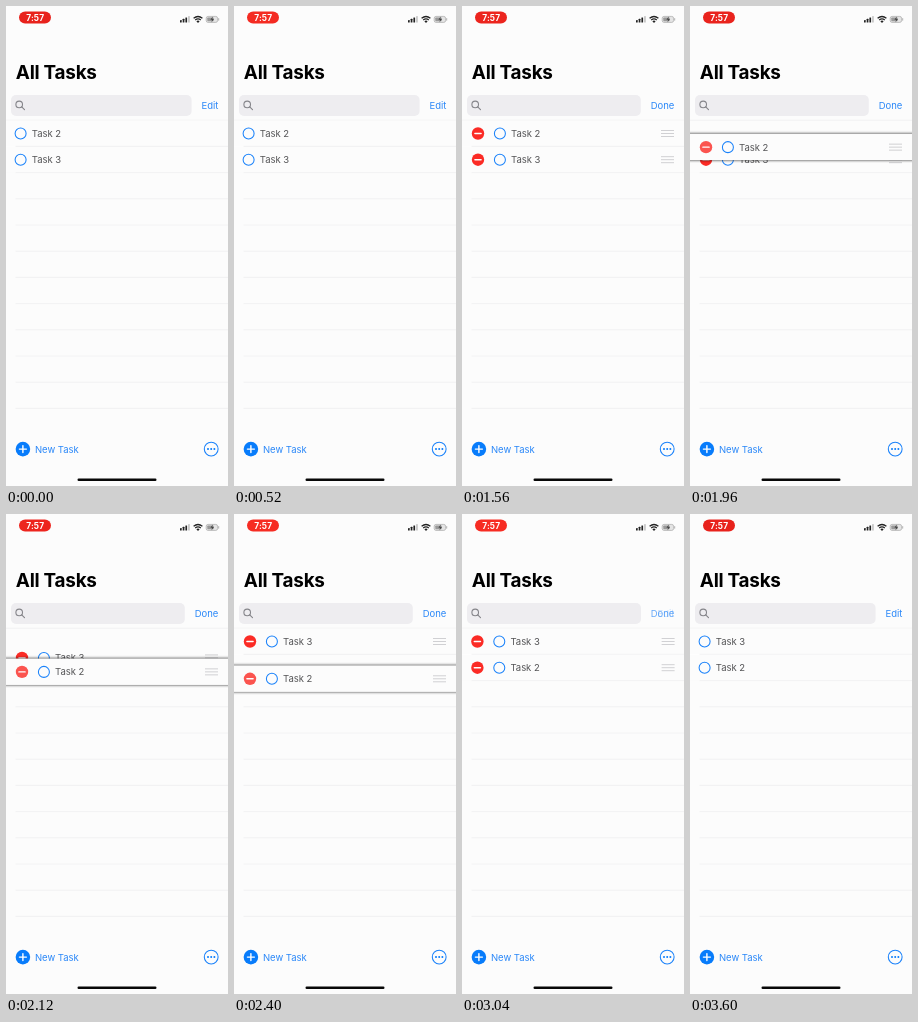
These frames come from a looping animation (222x480 px, 3640 ms). An HTML page:

```html
<!DOCTYPE html>
<html lang="en">
<head>
<meta charset="utf-8">
<title>All Tasks</title>
<style>
  html, body { margin: 0; width: 100%; height: 100%; overflow: hidden; background: #fcfcfc; }
  svg { display: block; width: 222px; height: 480px; }
  text { font: 400 9.5px Inter, "Liberation Sans", sans-serif; letter-spacing: -.05px; }
  .blue { fill: #087cfb; }
  text.blue { fill: #2b88f8; }
  .line { stroke: #efeff0; stroke-width: .8; }
  .ring { fill: none; stroke: #1a82fa; stroke-width: 1.05; }
  .grip { stroke: #d0d0d3; stroke-width: 1; }
  .mark { stroke: #fff; stroke-width: 1.4; stroke-linecap: round; }
  .title { font-size: 18.9px; font-weight: 650; letter-spacing: -.25px; }
  .clock { font-size: 8.4px; font-weight: 700; fill: #fff; letter-spacing: .1px; }
  .shadow { fill: #fcfcfc; filter: drop-shadow(0 .6px 1.6px rgba(0, 0, 0, .95)); }
</style>
</head>
<body>
<svg viewBox="0 0 222 480">
  <rect width="222" height="480" fill="#fcfcfc"/>

  <rect id="pill" x="13" y="5.4" width="32" height="12.2" rx="6.1"/>
  <text class="clock" x="29.2" y="14.6" text-anchor="middle">7:57</text>
  <g fill="#222">
    <rect x="174" y="14" width="1.7" height="2.6" rx=".4"/>
    <rect x="176.7" y="12.8" width="1.7" height="3.8" rx=".4"/>
    <rect x="179.4" y="11.4" width="1.7" height="5.2" rx=".4"/>
    <rect x="182.1" y="10" width="1.7" height="6.6" rx=".4" fill="#c4c4c4"/>
    <path d="M192 17l-1.6-1.8q1.6-1.3 3.2 0z"/>
  </g>
  <g fill="none" stroke="#222" stroke-width="1.3">
    <path d="M187.6 12.2q4.4-3.4 8.8 0M189.2 14q2.8-2.2 5.6 0"/>
  </g>
  <rect x="200.2" y="10.4" width="11.4" height="6" rx="1.8" fill="#e4e4e4" stroke="#aaa" stroke-width=".7"/>
  <rect x="201.3" y="11.5" width="6.4" height="3.8" rx=".8" fill="#999"/>
  <path d="M206.8 10.6l-2.4 3.2h1.7l-.6 2.5 2.5-3.3h-1.7z" fill="#444"/>
  <path d="M212.7 12.2v2.4" stroke="#aaa" stroke-width=".9"/>

  <text class="title" x="9.8" y="73.2">All Tasks</text>
  <rect id="field" x="5" y="89" height="21" rx="5" fill="#eeedf0"/>
  <g fill="none" stroke="#85858a" stroke-width="1.1" stroke-linecap="round">
    <circle cx="13.2" cy="98.4" r="3.3"/>
    <path d="M15.7 100.9l2.8 2.8"/>
  </g>
  <text id="edit" class="blue" x="212.3" y="103.1" text-anchor="end">Edit</text>
  <text id="done" class="blue" x="212.3" y="103.1" text-anchor="end">Done</text>

  <g id="lines"></g>
  <g id="rows"></g>

  <circle cx="16.9" cy="443.1" r="7.3" class="blue"/>
  <path class="mark" d="M13.4 443.1h7M16.9 439.6v7"/>
  <text class="blue" x="29" y="446.6">New Task</text>
  <circle class="ring" cx="205.2" cy="443.1" r="6.9"/>
  <g class="blue">
    <circle cx="202" cy="443.1" r="1"/>
    <circle cx="205.2" cy="443.1" r="1"/>
    <circle cx="208.4" cy="443.1" r="1"/>
  </g>
  <rect x="71.5" y="472.6" width="79" height="2.4" rx="1.2" fill="#080808"/>
</svg>
<script>
const LOOP = 3640, TOP = 114.2, PITCH = 26.2, INDENT = 23.3;
const $ = id => document.getElementById(id);

// Each track lists [time, value] steps, eased between neighbours.
const tracks = {
  editing: [[1020, 0], [1340, 1], [3010, 1], [3330, 0]],
  label:   [[1020, 0], [1110, 1], [3010, 1], [3100, 0]],
  lift:    [[1700, 0], [1860, 1], [2440, 1], [2700, 0]],
  drag:    [[1800, 0], [2150, 31], [2360, 37.3], [2440, 37.3], [2700, PITCH]],
  swap:    [[2005, 0], [2285, 1]]
};

const ease = p => p * p * (3 - 2 * p);

function at(name, t) {
  const steps = tracks[name];
  if (t <= steps[0][0]) return steps[0][1];
  for (let i = 1; i < steps.length; i++) {
    const [t0, a] = steps[i - 1], [t1, b] = steps[i];
    if (t < t1) return a + (b - a) * ease((t - t0) / (t1 - t0));
  }
  return steps[steps.length - 1][1];
}

function makeRow(name) {
  const row = document.createElementNS("http://www.w3.org/2000/svg", "g");
  row.innerHTML = `
    <rect class="shadow" x="-8" width="238" height="${PITCH}" opacity="0"/>
    <rect y=".4" width="222" height="${PITCH - .4}" fill="#fcfcfc"/>
    <path class="line" d="M9.5 ${PITCH}H222"/>
    <g class="shift">
      <g class="minus">
        <circle cx="-7.3" cy="13.3" r="6.2" fill="#fb2b25"/>
        <path class="mark" d="M-10.4 13.3h6.2"/>
      </g>
      <circle class="ring" cx="14.6" cy="13.3" r="5.5"/>
      <text x="25.8" y="16.8" fill="#555557">${name}</text>
    </g>
    <path class="grip" d="M199 10.3h13M199 13.3h13M199 16.3h13"/>`;
  $("rows").append(row);
  const part = c => row.querySelector("." + c);
  return { row, shadow: part("shadow"), line: part("line"), shift: part("shift"),
           minus: part("minus"), grip: part("grip") };
}

function place(r, y, editing, lift) {
  r.row.setAttribute("transform", `translate(0 ${y})`);
  r.shift.setAttribute("transform", `translate(${INDENT * editing} 0)`);
  r.minus.setAttribute("opacity", Math.min(1, editing * 1.5) * (1 - .2 * lift));
  r.grip.setAttribute("transform", `translate(${INDENT * (1 - editing)} 0)`);
  r.grip.setAttribute("opacity", editing);
  r.shadow.setAttribute("opacity", lift);
  r.line.setAttribute("opacity", 1 - lift);
}

let lines = `<path class="line" d="M0 ${TOP}H222"/>`;
for (let i = 3; i < 12; i++) lines += `<path class="line" d="M9.5 ${TOP + i * PITCH}H222"/>`;
$("lines").innerHTML = lines;

const still = makeRow("Task 3"), moved = makeRow("Task 2");

function draw(t) {
  const editing = at("editing", t), label = at("label", t);
  place(still, TOP + PITCH * (1 - at("swap", t)), editing, 0);
  place(moved, TOP + at("drag", t), editing, at("lift", t));
  $("field").setAttribute("width", 180.6 - 6.8 * editing);
  $("edit").setAttribute("opacity", 1 - label);
  $("done").setAttribute("opacity", label);
  const glow = .5 - .5 * Math.cos(t / LOOP * 4 * Math.PI);
  $("pill").setAttribute("fill", `rgb(${232 + 20 * glow}, ${34 + 14 * glow}, ${28 + 10 * glow})`);
}

const start = performance.now();
function tick() {
  draw((performance.now() - start) % LOOP);
  requestAnimationFrame(tick);
}
draw(0);
requestAnimationFrame(tick);
</script>
</body>
</html>
```
